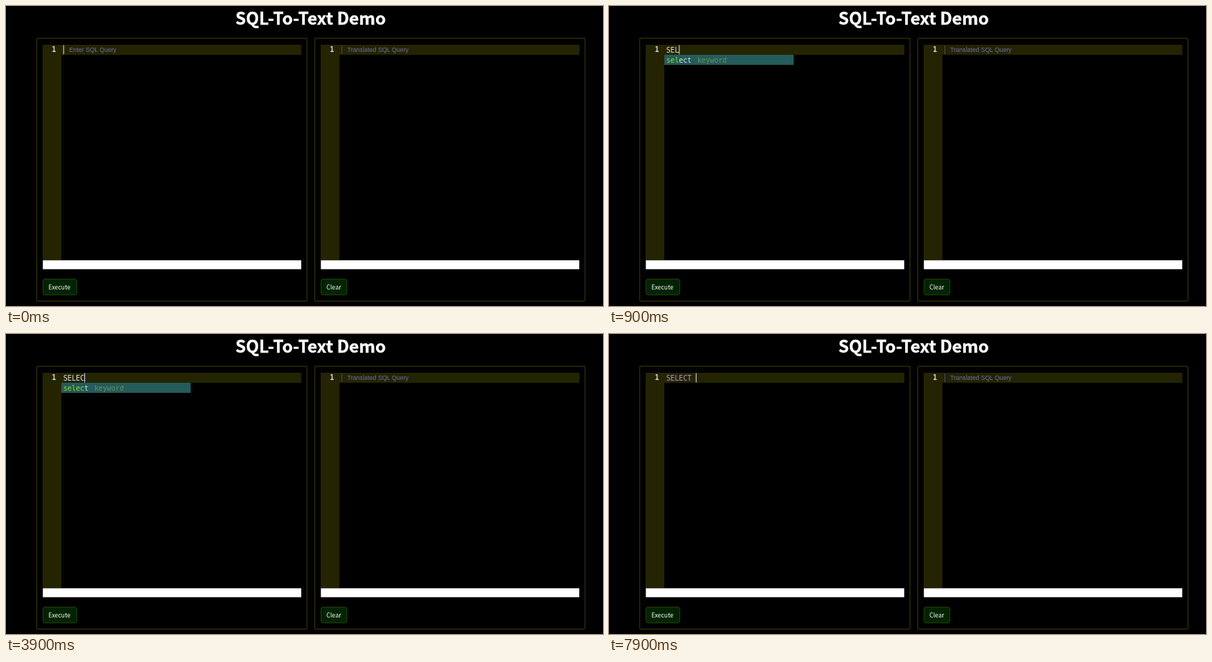
An HTML page for the animation above (8 s loop, 831 px wide and 418 px high).

```html
<!DOCTYPE html>
<html lang="en">
<head>
<meta charset="utf-8">
<title>SQL-To-Text Demo</title>
<style>
html, body { margin: 0; width: 100%; height: 100%; overflow: hidden; background: #000; }
svg { display: block; width: 831px; height: 418px; }
text { white-space: pre; }
.ui { font-family: "Noto Sans CJK JP", "Noto Sans CJK SC", "Noto Sans", sans-serif; fill: #fff; }
.title { font-size: 23.6px; font-weight: 700; text-anchor: middle; stroke: #fff; stroke-width: 0.4px; }
.button { font-size: 8.5px; font-weight: 500; }
.code { font: 9.75px "DejaVu Sans Mono", monospace; fill: #dbdbdb; }
.line { font-weight: 700; }
.hint { font: 8.6px "Liberation Sans", Arial, sans-serif; fill: #6d6da4; }
.hit { fill: #92db24; }
.meta { fill: #6d6da4; }
.active .meta { fill: #6d8c55; }
</style>
</head>
<body>
<svg id="stage" viewBox="0 0 831 418"></svg>
<script>
const NS = "http://www.w3.org/2000/svg";
const stage = document.getElementById("stage");
const OLIVE = "#242400";
const CHAR = 5.87, ROW = 13.83, CODE_X = 79.7, LOOP = 8000;

function add(parent, tag, attrs, content) {
  const el = document.createElementNS(NS, tag);
  for (const key in attrs) el.setAttribute(key, attrs[key]);
  if (content !== undefined) el.textContent = content;
  return parent.appendChild(el);
}

function box(parent, x, y, width, height, fill, more = {}) {
  return add(parent, "rect", { x, y, width, height, fill, ...more });
}

function label(parent, x, y, cls, content) {
  return add(parent, "text", { x, y, class: cls }, content);
}

function panel(x, hint, button, buttonWidth) {
  box(stage, x + 0.7, 45, 376.3, 366.3, "none", { rx: 2, stroke: "#2a2c00", "stroke-width": 1.4 });
  box(stage, x + 9, 54, 26, 300, OLIVE);
  box(stage, x + 9, 54, 360, 14, OLIVE);
  box(stage, x + 9.3, 354.3, 359.7, 12.4, "#fff");
  label(stage, x + 21.7, 64.3, "code line", "1");
  box(stage, x + 9.5, 380.5, buttonWidth, 22, "#002400", { rx: 2.5, stroke: "#243c08" });
  label(stage, x + 17, 394.8, "ui button", button);
  return label(stage, x + 46, 64, "hint", hint);
}

// Draws the suggestions; matched letters are found in order.
function popup(words, query) {
  const group = add(stage, "g", {});
  if (!words.length) return group;
  const height = words.length * ROW;
  box(group, 77, 68, 180, height, OLIVE);
  box(group, 77, 68, 180, 14, "#245b5b");
  words.forEach((word, i) => {
    const row = add(group, "text", {
      x: CODE_X, y: 79.3 + i * ROW, class: i ? "code" : "code active"
    });
    let matched = 0;
    for (const letter of word) {
      const hit = letter === query[matched];
      if (hit) matched++;
      add(row, "tspan", hit ? { class: "hit" } : {}, letter);
    }
    add(row, "tspan", { x: CODE_X + word.length * CHAR + 8, class: "meta" }, "keyword");
  });
  if (words.length > 7) {
    box(group, 247, 68, 9.5, height, "#fff");
    box(group, 249, 71, 5.5, 37, "#b6b6b6", { rx: 2.75 });
  }
  return group;
}

label(stage, 424, 26.4, "ui title", "SQL-To-Text Demo");
const hint = panel(42, "Enter SQL Query", "Execute", 47);
panel(429, "Translated SQL Query", "Clear", 36);
box(stage, 467, 55, 1, 12, "#49496d");

const typed = label(stage, CODE_X, 64.6, "code", "");
const caret = box(stage, 80, 54.5, 1, 13, "#dbdbff");

// start time, typed text, suggestions
const steps = [
  [0, "", []],
  [400, "S", ["select", "set", "sum", "as", "asc", "isnull", "case", "desc"]],
  [700, "SE", ["select", "set", "case"]],
  [800, "SEL", ["select"]],
  [1700, "SELE", ["select"]],
  [3200, "SELEC", ["select"]],
  [4800, "SELECT", ["select"]],
  [5700, "SELECT ", []]
].map(([start, value, words]) => ({
  start, value, list: popup(words, value.toLowerCase())
}));

let shown;
function draw(now) {
  const time = now % LOOP;
  const step = steps.filter(s => s.start <= time).pop();
  if (step === shown) return;
  shown = step;
  typed.textContent = step.value;
  typed.style.fill = step.value.startsWith("SELECT") ? "#b692db" : "#e4e4e4";
  caret.setAttribute("x", CODE_X + step.value.length * CHAR);
  hint.style.display = step.value.length < 2 ? "" : "none";
  for (const s of steps) s.list.style.display = s === step ? "" : "none";
}

const origin = performance.now();
function tick() {
  draw(performance.now() - origin);
  requestAnimationFrame(tick);
}
tick();
</script>
</body>
</html>
```
